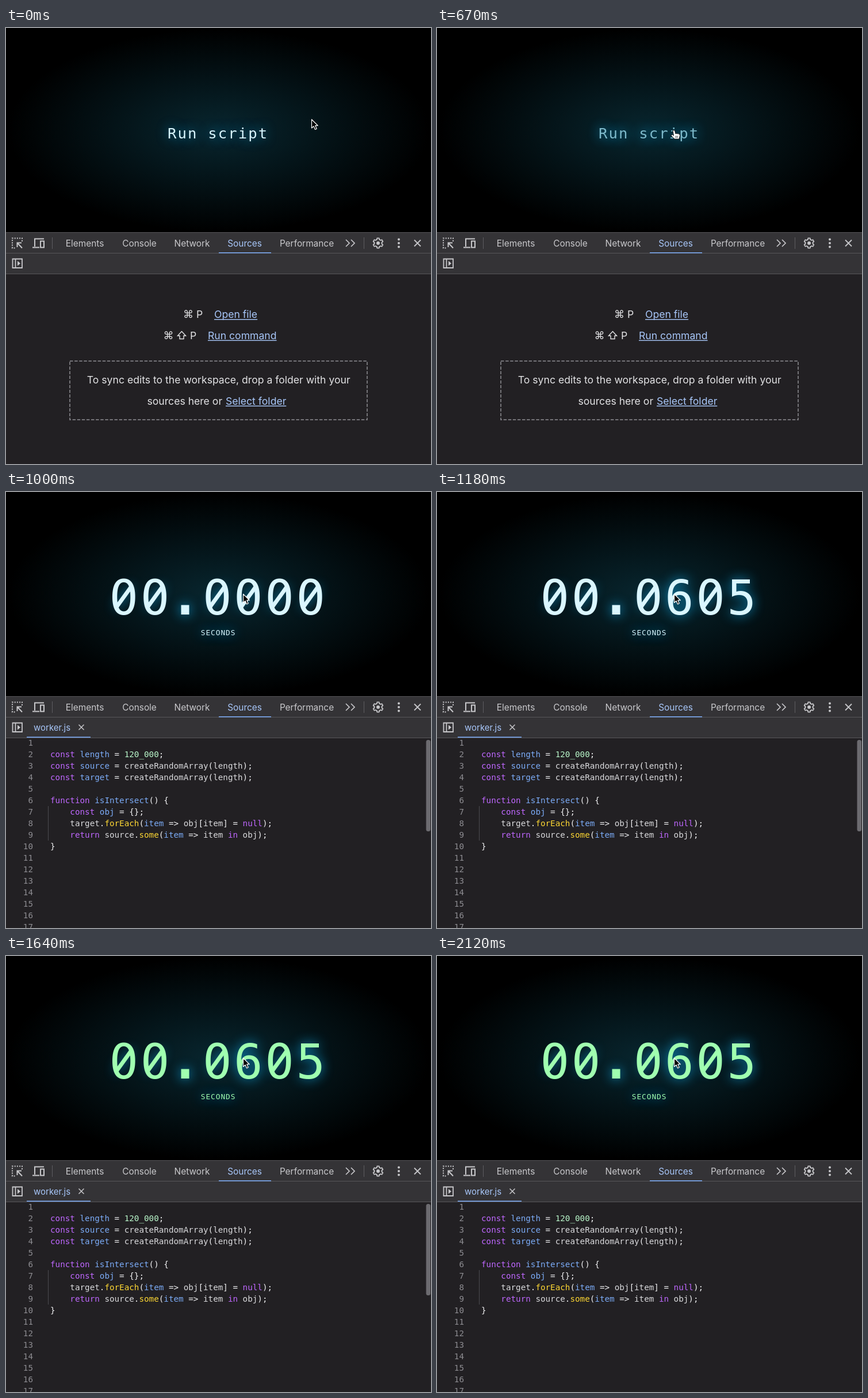
These frames come from a looping animation (739x758 px, 2.18 s). An HTML page with a canvas:

```html
<!DOCTYPE html>
<html lang="en">
<head>
<meta charset="utf-8">
<style>
  html, body { margin: 0; width: 100%; height: 100%; overflow: hidden; background: #000; }
  canvas { display: block; }
</style>
</head>
<body>
<canvas width="739" height="758"></canvas>
<script>
const c = document.querySelector('canvas').getContext('2d');
const LOOP = 2180;
const UI = 'Inter, "Open Sans", sans-serif';
const MONO = '"DejaVu Sans Mono", monospace';
const TEXT = '#e3e3e5', ICON = '#c7c7ca', BLUE = '#a8c7fa', ACCENT = '#7cacf8';
const ICE = [218, 246, 255], GREEN = [160, 255, 176], DIM = [126, 186, 203];
const MIDDLE = 182.5, FAR = 2000;

const source = `
const length = 120_000;
const source = createRandomArray(length);
const target = createRandomArray(length);

function isIntersect() {
    const obj = {};
    target.forEach(item => obj[item] = null);
    return source.some(item => item in obj);
}`.split('\n');

const ramp = (t, a, b) => Math.min(1, Math.max(0, (t - a) / (b - a)));
const ease = p => p * p * (3 - 2 * p);
const mix = (a, b, p) => `rgb(${a.map((v, i) => v + (b[i] - v) * p)})`;

function text(s, x, y, font, color = TEXT, align = 'left', spacing = 0) {
  c.font = font;
  c.fillStyle = color;
  c.textAlign = align;
  c.letterSpacing = spacing + 'px';
  c.fillText(s, x, y);
}

function rect(x, y, w, h, color) {
  c.fillStyle = color;
  c.fillRect(x, y, w, h);
}

function stroke(d, color = ICON, width = 1.8, dash = []) {
  c.strokeStyle = color;
  c.lineWidth = width;
  c.setLineDash(dash);
  c.stroke(new Path2D(d));
  c.setLineDash([]);
}

function fill(d, color = ICON) {
  c.fillStyle = color;
  c.fill(new Path2D(d));
}

function link(s, x, y) {
  text(s, x, y, '17.6px ' + UI, BLUE);
  rect(x, y + 2, c.measureText(s).width, 1.4, BLUE);
}

// Casts only the shadow of a drawing, then paints the drawing over it.
function glowing(alpha, draw) {
  c.save();
  c.shadowColor = `rgba(14,168,230,${alpha})`;
  c.shadowBlur = 20;
  c.shadowOffsetX = FAR;
  c.translate(-FAR, 0);
  draw();
  c.restore();
  draw();
}

function backdrop() {
  rect(0, 0, 739, 758, '#000');
  c.save();
  c.translate(369.5, 178);
  c.scale(1, 178 / 369.5);
  const g = c.createRadialGradient(0, 0, 0, 0, 0, 366);
  g.addColorStop(0, '#08262f');
  g.addColorStop(1, '#000');
  c.fillStyle = g;
  c.fillRect(-370, -370, 740, 740);
  c.restore();
}

// Draws a part of the display squeezed around its middle line.
function flip(shown, draw) {
  if (shown <= 0) return;
  c.save();
  c.globalAlpha = shown;
  c.translate(0, MIDDLE);
  c.scale(1, 0.55 + 0.45 * shown);
  c.translate(0, -MIDDLE);
  draw();
  c.restore();
}

function button(t) {
  const hover = ease(ramp(t, 350, 480));
  const color = mix(ICE, DIM, ramp(t, 590, 660));
  glowing(0.75 + 0.25 * hover, () =>
    text('Run script', 281, 192, '25.6px ' + MONO, color, 'left', 2.13));
}

// A zero whose inner dot is cut away in favour of a slash.
function slashedZero(x, color, font) {
  c.save();
  c.beginPath();
  c.rect(x - 40, MIDDLE - 60, 80, 120);
  c.ellipse(x, MIDDLE, 9, 15, 0, 0, 2 * Math.PI);
  c.clip('evenodd');
  text('0', x, 213, font, color, 'center');
  c.restore();
  stroke(`M${x - 13} ${MIDDLE + 18}L${x + 13} ${MIDDLE - 18}`, color, 7);
}

function counter(t) {
  const seconds = 0.0605 * ramp(t, 1020, 1080);
  const color = mix(ICE, GREEN, ramp(t, 1240, 1380));
  const digits = seconds.toFixed(4).padStart(7, '0');
  const font = '84px ' + MONO;
  glowing(0.9, () => {
    [...digits].forEach((d, i) => {
      const x = 204.8 + i * 54.15;
      if (d === '.') rect(304.5, 196.5, 14, 16.5, color);
      else if (d === '0') slashedZero(x, color, font);
      else text(d, x, 213, font, color, 'center');
    });
    text('SECONDS', 338.8, 249.3, '12.8px ' + MONO, color, 'left', 0.95);
  });
}

function gear() {
  let d = '';
  for (let i = 0; i < 48; i++) {
    const a = (i + 0.5) / 48 * 2 * Math.PI;
    const r = i % 8 < 4 ? 8.7 : 6.6;
    d += `${i ? 'L' : 'M'}${647 + r * Math.sin(a - 0.26)} ${374 - r * Math.cos(a - 0.26)}`;
  }
  stroke(d + 'Z');
  fill('M650 374a3 3 0 1 1-6 0a3 3 0 1 1 6 0');
}

function toolbar(codeOpen) {
  rect(0, 355, 739, 403, '#222023');
  rect(0, 355, 739, 72, '#343336');
  for (const y of [355, 391, 427]) rect(0, y, 739, 1, '#57565a');

  stroke('M28 371V365.500H11V382.500H17', ICON, 2, [2, 2.2]);
  stroke('M19.500 381V373.500H27M20 374L28 382.500', ICON, 2);
  stroke('M50 380V366.500H66M46 381.500H58M60 370.500H66V381.500H60Z', ICON, 2);
  rect(80, 364, 1, 20, '#5e5d62');
  rect(622, 364, 1, 20, '#5e5d62');
  stroke('M591 368l6 6-6 6M600 368l6 6-6 6', ICON, 1.7);
  gear();
  for (const y of [367.5, 374, 380.5]) fill(`M685 ${y}a2 2 0 1 1-4 0a2 2 0 1 1 4 0`);
  stroke('M710 368.500l11 11M721 368.500l-11 11');
  stroke('M11.500 401.500H28V417H11.500ZM16.500 401.500V417');
  fill('M20 405v8.500l5-4.250Z');

  const tabs = { Elements: 137, Console: 232, Network: 323.5, Sources: 415, Performance: 523 };
  for (const name in tabs)
    text(name, tabs[name], 379.5, '15.4px ' + UI, name === 'Sources' ? BLUE : '#c9c9cc', 'center');
  rect(370, 390, 91, 1.5, ACCENT);

  if (codeOpen) {
    text('worker.js', 48, 414.5, '15px ' + UI, BLUE);
    stroke('M126.500 404.500l9 9M135.500 404.500l-9 9', ICON, 1.5);
    rect(36, 425.5, 111, 1.5, ACCENT);
  }
}

function hints() {
  const body = '17.6px ' + UI, keys = '18px "DejaVu Sans", sans-serif';
  text('⌘', 317, 504, keys, TEXT, 'center');
  text('P', 331, 504, body);
  link('Open file', 362, 504);
  text('⌘', 282.5, 540.5, keys, TEXT, 'center');
  stroke('M305.500 527.500l7 7.500h-3.500v5.500h-7V535h-3.500Z', TEXT, 1.4);
  text('P', 320, 540.5, body);
  link('Run command', 351, 540.5);
  stroke('M111 579H628V681H111Z', '#747378', 2, [5.5, 2.6]);
  text('To sync edits to the workspace, drop a folder with your', 369.7, 618, body, TEXT, 'center');
  text('sources here or', 376, 654.5, body, TEXT, 'right');
  link('Select folder', 382, 654.5);
}

function tokenColor(word, before, after) {
  if (/^(const|function|return|null|in)$/.test(word)) return '#bf67ff';
  if (/^\d/.test(word)) return '#b8f5c9';
  if (!/^\w/.test(word)) return '#f0f0f2';
  if (before.endsWith('.')) return '#fdd633';
  if (/(const|function) $/.test(before) || after.startsWith(' =>')) return ACCENT;
  return '#dadadd';
}

function editor(t) {
  const font = '14.25px ' + MONO;
  for (let i = 0; i < 17; i++) {
    const y = 441 + i * 20, line = source[i] || '';
    text(i + 1, 47, y, font, '#8d8c91', 'right');
    for (const { 0: word, index } of line.matchAll(/\w+|[^\w\s]+/g)) {
      const color = tokenColor(word, line.slice(0, index), line.slice(index + word.length));
      text(word, 77 + index * 8.58, y, font, color);
    }
  }
  rect(73, 546, 1, 60, '#4b4a4f');
  c.globalAlpha = 1 - ramp(t, 1660, 1800);
  c.fillStyle = '#6c6b70';
  c.beginPath();
  c.roundRect(730.5, 431, 7.5, 159, 3.5);
  c.fill();
  c.globalAlpha = 1;
}

function cursor(t) {
  const p = ease(ramp(t, 60, 540));
  const x = 531 - 119 * p, y = 158.5 + 18.5 * p;
  c.save();
  c.translate(x, y);
  c.lineJoin = 'round';
  if (x < 457 && t < 740) {
    const hand = 'M-2 1.500Q0-.5 1.500 1.500L3 7Q5 5.500 6 7Q8 6 8.500 7.500Q11 7 10.500 10L9 16H1L-4.500 10.500Q-5 8 -2.500 8.500L-.5 10Z';
    fill(hand, '#fff');
    stroke(hand, '#111', 1);
    stroke('M3.500 10.500v3.500M6 10.500v3.500', '#111', 0.9);
  } else {
    const arrow = 'M.5.5V15.500L4 12.300L6.500 18L9.200 16.800L6.800 11.200H11.300Z';
    fill(arrow, '#000');
    stroke(arrow, '#fff', 1.2);
  }
  c.restore();
}

function frame(now) {
  const t = now % LOOP, codeOpen = t >= 1000;
  backdrop();
  flip(1 - ramp(t, 700, 785), () => button(t));
  flip(ramp(t, 760, 915), () => counter(t));
  toolbar(codeOpen);
  codeOpen ? editor(t) : hints();
  cursor(t);
  requestAnimationFrame(frame);
}
requestAnimationFrame(frame);
</script>
</body>
</html>
```
